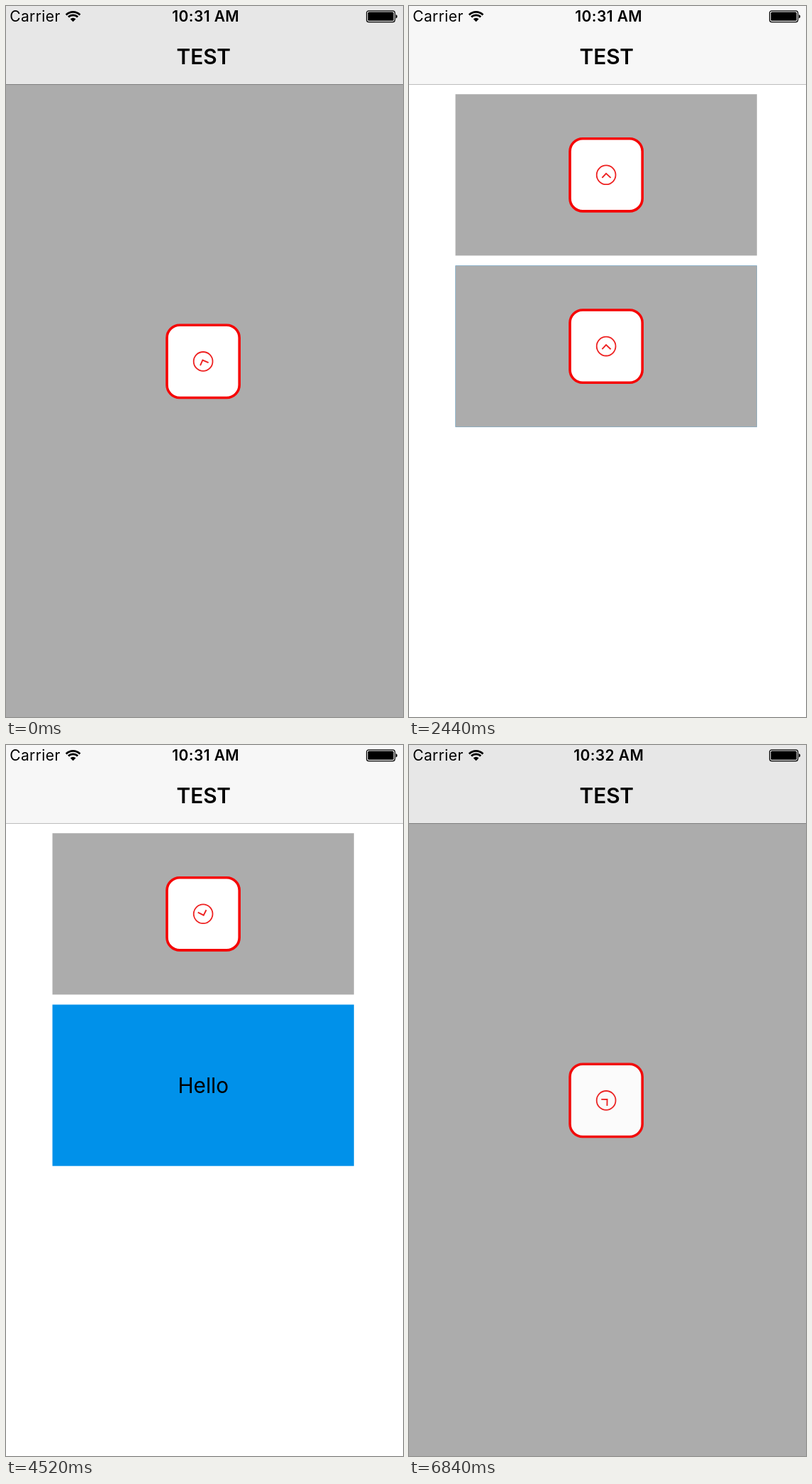
An HTML page that plays this animation: 560 px wide and 1001 px high, repeating every 6.86 s.

```html
<!DOCTYPE html>
<html lang="en">
<head>
<meta charset="utf-8">
<title>Loading states</title>
<style>
  html, body { margin: 0; width: 100%; height: 100%; overflow: hidden; background: #fff; }
  svg { display: block; width: 100%; height: 100%; }
  text { font-family: Inter, "Liberation Sans", sans-serif; fill: #000; }
  .mid { text-anchor: middle; }
  .status { font-size: 21px; letter-spacing: .4px; }
  .bold { font-weight: 600; }
  .title { font-size: 29.75px; }
</style>
</head>
<body>
<svg viewBox="0 0 560 1001">
  <defs>
    <g id="frame">
      <rect x="-51.1" y="-51.1" width="102.2" height="102.2" rx="18" fill="#fff" stroke="#f50505" stroke-width="3.6"/>
      <circle r="13.4" fill="none" stroke="#ee2222" stroke-width="1.8"/>
    </g>
    <!-- Clock hands, opening to the right -->
    <path id="hands" d="M4.36 -6.36L-2 0L3.87 5.87" fill="none" stroke="#ee2222" stroke-width="1.9"/>
  </defs>

  <rect width="560" height="1001" fill="#fff"/>

  <rect x="65.5" y="365.5" width="425.3" height="227.2" fill="#0091ea"/>
  <text class="mid title" x="278.3" y="490">Hello</text>

  <g id="loaders"></g>

  <rect width="560" height="110" fill="#f5f5f5" fill-opacity=".807"/>
  <rect y="110" width="560" height="1" fill-opacity=".26"/>
  <text class="status" x="5.2" y="22.2">Carrier</text>
  <g transform="translate(94.6 22.2)" fill="none" stroke="#000" stroke-width="2.8">
    <path d="M0 0L-3.9 -3.9A5.5 5.5 0 0 1 3.9 -3.9Z" fill="#000" stroke="none"/>
    <path d="M-6.6 -6.6A9.3 9.3 0 0 1 6.6 -6.6"/>
    <path d="M-9.8 -9.8A13.8 13.8 0 0 1 9.8 -9.8"/>
  </g>
  <text id="time" class="mid status bold" x="281.7" y="22.2"></text>
  <rect x="508.6" y="6.8" width="40" height="15.8" rx="3" fill="none" stroke="#000" stroke-width="1.2"/>
  <rect x="510.4" y="8.6" width="36.4" height="12.2" rx="1.6"/>
  <path d="M549.9 12Q552 12.6 552 14.7T549.9 17.4Z"/>
  <text class="mid title bold" x="278.8" y="82">TEST</text>
</svg>
<script>
const LOOP = 6860, SPIN = 0.598, FADE = 120;
const RELOAD = 6540, TICK = 4560;
const NS = 'http://www.w3.org/2000/svg';

function add(parent, tag, attrs) {
  const el = document.createElementNS(NS, tag);
  for (const key in attrs) el.setAttribute(key, attrs[key]);
  return parent.appendChild(el);
}

function ease(start, length, t) {
  const u = Math.min(1, Math.max(0, (t - start) / length));
  return u * u * (3 - 2 * u);
}

// A grey cover with a spinner; it fades away at `leave`, the spinner faster by `power`.
function makeLoader(x, y, w, h, cy, leave, power, returns) {
  const root = document.getElementById('loaders');
  const cover = add(root, 'rect', { x, y, width: w, height: h, fill: '#acacac' });
  const box = add(root, 'g', { transform: `translate(278.1 ${cy})` });
  add(box, 'use', { href: '#frame' });
  const hands = add(box, 'use', { href: '#hands' });

  return t => {
    const again = returns && t >= RELOAD;
    const shown = 1 - ease(leave, FADE, t);
    const coverAlpha = again ? ease(RELOAD, 290, t) : shown;
    const boxAlpha = again ? ease(RELOAD, 345, t) : shown ** power;
    const angle = again ? (t - RELOAD) * 0.6 - 45 : (t - 4100) * SPIN;
    cover.setAttribute('opacity', coverAlpha);
    box.setAttribute('opacity', boxAlpha);
    hands.setAttribute('transform', `rotate(${angle})`);
  };
}

const loaders = [
  makeLoader(65.5, 124.2, 425.3, 227.2, 237.8, 5283, 3, false),
  makeLoader(65.5, 365.5, 425.3, 227.2, 479.1, 4041, 2.7, false),
  makeLoader(0, 0, 560, 1001, 500.4, 1304, 1.2, true)
];
const time = document.getElementById('time');

function draw(t) {
  loaders.forEach(update => update(t));
  time.textContent = t < TICK ? '10:31 AM' : '10:32 AM';
}

const begin = performance.now();
function loop(now) {
  draw(Math.max(0, now - begin) % LOOP);
  requestAnimationFrame(loop);
}
draw(0);
requestAnimationFrame(loop);
</script>
</body>
</html>
```
